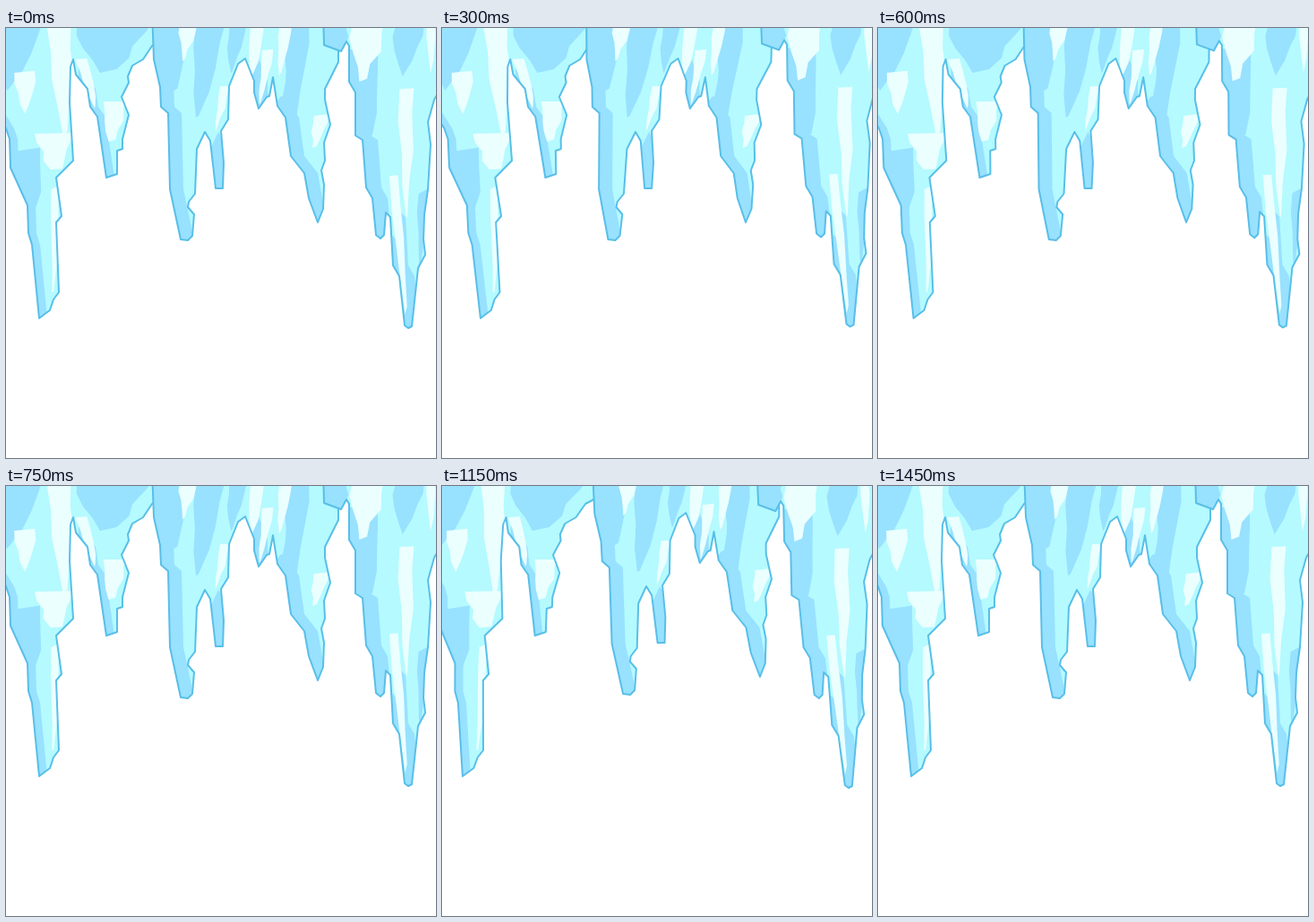
An HTML page with a canvas that plays this animation: 480 px wide and 480 px high, repeating every 1500 ms.

```html
<!DOCTYPE html>
<html lang="en">
<head>
<meta charset="utf-8">
<title>Icicles</title>
<style>
  html, body { margin: 0; width: 100%; height: 100%; overflow: hidden; background: #fff; }
  canvas { display: block; }
</style>
</head>
<body>
<canvas id="stage" width="480" height="480"></canvas>
<script>
const ctx = document.getElementById('stage').getContext('2d');
const ICE = '#b4faff', SHADE = '#98e1ff', SHINE = '#ebffff', EDGE = '#58bfe8';
const STEP = 50, STEPS = 30;

let seed = 7;
function random() {
  seed = (seed * 16807) % 2147483647;
  return seed / 2147483647;
}

const polygon = points => new Path2D('M' + points.join(' ') + 'Z');

// A jagged splinter hanging from (x, y), narrowing towards its leaning tip.
function shard(colour, x, y, width, length, lean) {
  const left = [], right = [];
  for (let t = 0; t <= 1; t += 0.25) {
    const half = width / 2 * (1 - 0.85 * t * t);
    const jag = () => (random() - 0.5) * width * 0.2;
    left.push([x + lean * t - half + jag(), y + length * t]);
    right.unshift([x + lean * t + half + jag(), y + length * (t - 0.08 * random())]);
  }
  return { colour, path: polygon([...left, ...right]) };
}
const shade = (...shape) => shard(SHADE, ...shape);
const shine = (...shape) => shard(SHINE, ...shape);

// Each swing is [x shift, x shift per unit of y, y shift] at its far end;
// flank is the width of the shaded left side.
const clusters = [
  {
    first: [0.7, 0.0193, 0],
    second: [-2.2, -0.0365, 0],
    flank: 9,
    outline: new Path2D('M-20,-20 -20,80 0,112 4,124 5,156 24,198 25,229 29,242 37,324 49,315 53,303 59,295 ' +
      '56,217 62,210 56,167 75,148 71,83 72,43 75,35 78,52 91,68 94,88 102,99 112,167 124,163 ' +
      '124,137 130,135 130,124 137,97 129,77 137,61 136,54 141,42 153,35 163,20 185,8 185,-20Z'),
    shards: [
      shade(14, -5, 46, 75, -12), shade(118, -5, 85, 55, -8), shade(24, 138, 30, 66, 8),
      shine(59, -5, 28, 125, 8), shine(21, 50, 22, 46, 0), shine(54, 118, 40, 40, 2),
      shine(55, 180, 10, 115, -2), shine(84, 35, 12, 55, 16), shine(121, 82, 26, 45, -2)
    ]
  },
  {
    first: [-2.9, -0.035, 0],
    second: [5, 0.009, -4],
    flank: 15,
    outline: new Path2D('M163,-20 165,35 172,66 173,88 181,95 183,180 195,236 203,237 208,232 210,208 203,200 ' +
      '204,194 211,185 213,135 222,116 228,126 234,179 242,179 243,150 240,115 248,102 249,65 259,40 ' +
      '267,34 277,59 277,72 282,90 291,77 294,76 298,55 303,87 312,100 318,143 ' +
      '333,162 338,190 348,217 354,202 355,175 352,159 356,148 355,128 362,108 356,80 356,68 371,38 371,-20Z'),
    shards: [
      shade(179, -5, 34, 75, 8), shade(229, -5, 32, 105, -16), shade(259, -5, 18, 55, -8),
      shade(325, -5, 30, 105, -4),
      shine(204, -5, 18, 42, -6), shine(245, 65, 10, 50, -10), shine(281, -5, 15, 60, -6),
      shine(293, 25, 13, 60, -9), shine(312, -5, 14, 58, -6), shine(352, 98, 18, 36, -8)
    ]
  },
  {
    first: [2.1, 0.0165, -1.8],
    second: [-2.2, 0.021, 2],
    flank: 17,
    outline: new Path2D('M354,-20 355,19 374,26 380,15 383,20 383,60 390,72 390,120 398,125 402,178 409,190 ' +
      '413,231 418,235 422,231 424,206 429,211 432,265 439,277 445,332 449,335 453,333 460,268 468,253 ' +
      '466,236 467,208 471,180 474,130 471,105 478,80 495,50 495,-20Z'),
    shards: [
      shade(367, -5, 28, 34, 4), shade(451, -5, 36, 60, -8), shade(404, 25, 28, 95, 2),
      shade(465, 185, 10, 85, -3),
      shine(405, -5, 38, 65, -7), shine(474, -5, 10, 55, 0), shine(446, 68, 16, 145, 2),
      shine(433, 165, 10, 155, 13)
    ]
  }
];

// Straight moves between rest, first swing, rest, second swing and rest.
function swing(step) {
  if (step < 15) return { first: step < 7 ? step / 7 : (15 - step) / 8, second: 0 };
  return { first: 0, second: step < 23 ? (step - 15) / 8 : (29 - step) / 6 };
}

function fill(path, colour) {
  ctx.fillStyle = colour;
  ctx.fill(path);
}

function drawCluster({ first, second, flank, outline, shards }, amount) {
  const [shift, slant, lift] = first.map((value, i) => value * amount.first + second[i] * amount.second);
  ctx.save();
  ctx.transform(1, 0, slant, 1, shift, lift);
  ctx.save();
  ctx.clip(outline);
  fill(outline, SHADE);
  ctx.translate(flank, 0);
  fill(outline, ICE);
  ctx.translate(-flank, 0);
  for (const { path, colour } of shards) fill(path, colour);
  ctx.restore();
  ctx.strokeStyle = EDGE;
  ctx.lineWidth = 2;
  ctx.lineJoin = 'round';
  ctx.stroke(outline);
  ctx.restore();
}

function draw(now) {
  const amount = swing(Math.floor(now / STEP) % STEPS);
  ctx.fillStyle = '#fff';
  ctx.fillRect(0, 0, 480, 480);
  for (const cluster of clusters) drawCluster(cluster, amount);
  requestAnimationFrame(draw);
}

draw(0);
</script>
</body>
</html>
```
